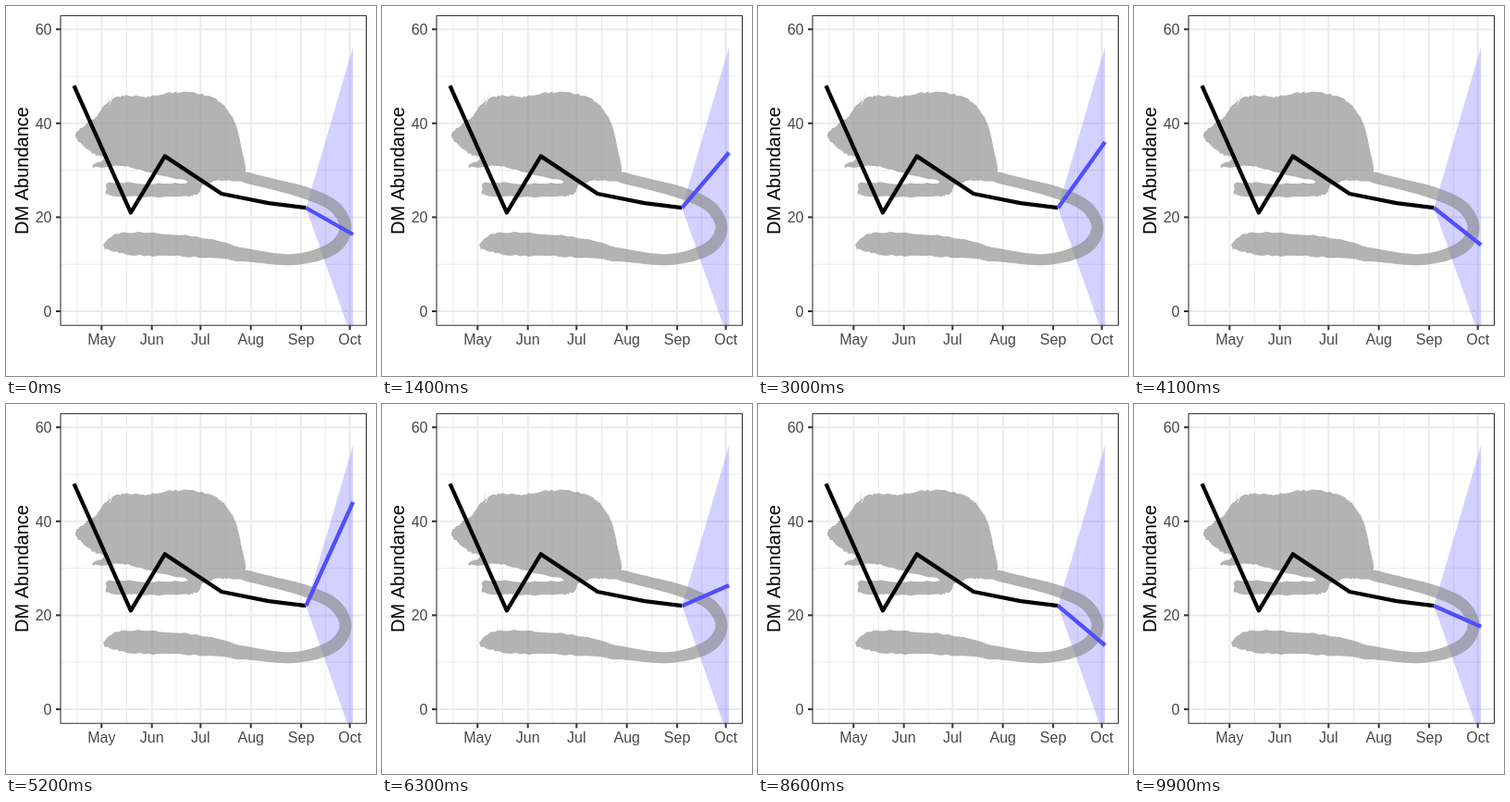
Recreate the animation shown at these times as an HTML page with a canvas. Size 400 by 400 pixels, loop 10 s.

```html
<!DOCTYPE html>
<html lang="en">
<head>
<meta charset="utf-8">
<title>Abundance forecast</title>
<style>
html, body { margin: 0; width: 100%; height: 100%; overflow: hidden; background: #fff; }
canvas { display: block; }
</style>
</head>
<body>
<canvas id="chart" width="400" height="400"></canvas>
<script>
const ctx = document.getElementById('chart').getContext('2d');
const left = 59, top_ = 10.5, right = 389.5, bottom = 345.3;
const font = '"Liberation Sans", Arial, sans-serif';

// Scales: days counted from the first of May, and abundance.
const xOf = day => 103.3 + day * 1.7543;
const yOf = v => 330 - v * 5.08;
const months = ['May', 'Jun', 'Jul', 'Aug', 'Sep', 'Oct'];
const monthStart = i => Math.round((Date.UTC(2023, 4 + i) - Date.UTC(2023, 4)) / 864e5);

const history = [[-17, 48], [18, 21], [39, 33], [74, 25], [103, 23], [126, 22]]
  .map(([day, v]) => [xOf(day), yOf(v)]);
const start = history[history.length - 1];
const endX = xOf(155);

// End height of each simulated outcome; four steps lead from one to the next.
const outcomes = [247, 79, 150, 150, 167, 131, 67, 78, 216, 303, 260, 235, 250,
  106, 170, 180, 197, 98, 247, 240, 61, 195, 327, 350, 147];
const stepMs = 100, stepsPer = 4;

const body = [
  [75, 141], [85, 129], [98, 119], [108, 106], [122, 98], [141, 97], [151, 98.5],
  [180, 93.5], [212, 95.5], [234, 106], [248, 127], [255, 156], [259, 178], [251, 188],
  [230, 189], [213, 194], [207, 203], [185, 206.5], [115, 205], [109, 198], [114, 191],
  [165, 192], [197, 190], [155, 180], [126, 173], [93, 174], [106, 165], [92, 158]
];
// Centre and half width along the tail.
const tail = [
  [245, 182, 6], [290, 193, 6], [325, 202.5, 6.5], [355, 217, 6.5], [367, 240, 6.5],
  [353, 262, 7], [312, 274, 6], [262, 269.5, 7], [205, 260.5, 11], [150, 257.5, 12.5],
  [120, 256.5, 10], [104, 261, 1]
];

// Catmull-Rom curve through points of any dimension.
function spline(points, closed) {
  const n = points.length, out = [], parts = 10;
  const at = i => points[closed ? (i + n) % n : Math.min(Math.max(i, 0), n - 1)];
  for (let i = 0; i < (closed ? n : n - 1); i++) {
    const [a, b, c, d] = [at(i - 1), at(i), at(i + 1), at(i + 2)];
    for (let k = 0; k < parts; k++) {
      const t = k / parts;
      out.push(b.map((p, j) => p + t / 2 * (c[j] - a[j]
        + t * (2 * a[j] - 5 * p + 4 * c[j] - d[j] + t * (3 * (p - c[j]) + d[j] - a[j])))));
    }
  }
  return out;
}

function tube(spine) {
  const outer = [], inner = [];
  spine.slice(0, -1).forEach(([x, y, half], i) => {
    const dx = spine[i + 1][0] - x, dy = spine[i + 1][1] - y, len = Math.hypot(dx, dy);
    outer.push([x + dy / len * half, y - dx / len * half]);
    inner.unshift([x - dy / len * half, y + dx / len * half]);
  });
  return [...outer, ...inner];
}

// The silhouette is furry everywhere except along the thin part of the tail.
const rat = new Path2D();
for (const outline of [spline(body, true), tube(spline(tail, false))]) {
  outline.forEach(([x, y], i) => {
    const fur = x < 255 ? Math.sin(i * i * 12.9) * 0.8 : 0;
    rat[i ? 'lineTo' : 'moveTo'](x, y + fur);
  });
  rat.closePath();
}

function line(points, color, width) {
  ctx.strokeStyle = color;
  ctx.lineWidth = width;
  ctx.beginPath();
  points.forEach(p => ctx.lineTo(...p));
  ctx.stroke();
}
const vLine = (x, w) => line([[x, top_], [x, bottom]], '#ebebeb', w);
const hLine = (y, w) => line([[left, y], [right, y]], '#ebebeb', w);

function text(label, x, y, size, align, color) {
  ctx.font = size + 'px ' + font;
  ctx.textAlign = align;
  ctx.fillStyle = color;
  ctx.fillText(label, x, y);
}

function drawGrid() {
  for (let i = 0; i <= months.length; i++) {
    vLine(xOf((monthStart(i - 1) + monthStart(i)) / 2), 1);
  }
  for (let v = 10; v < 60; v += 20) hLine(yOf(v), 1);
  months.forEach((_, i) => vLine(xOf(monthStart(i)), 2));
  for (let v = 0; v <= 60; v += 20) hLine(yOf(v), 2);
}

function drawAxes() {
  ctx.strokeStyle = '#333';
  ctx.lineWidth = 1.1;
  ctx.strokeRect(left, top_, right - left, bottom - top_);
  months.forEach((name, i) => {
    const x = xOf(monthStart(i));
    line([[x, bottom], [x, bottom + 5]], '#333', 2);
    text(name, x, 366, 16, 'center', '#474747');
  });
  for (let v = 0; v <= 60; v += 20) {
    line([[left - 5, yOf(v)], [left, yOf(v)]], '#333', 2);
    text(v, 49.5, yOf(v) + 5.8, 16, 'right', '#474747');
  }
  ctx.save();
  ctx.translate(24, 178);
  ctx.rotate(-Math.PI / 2);
  text('DM Abundance', 0, 0, 20, 'center', '#000');
  ctx.restore();
}

function outcomeAt(step) {
  const i = Math.floor(step / stepsPer), t = step % stepsPer / stepsPer;
  const from = outcomes[i], to = outcomes[(i + 1) % outcomes.length];
  const eased = t < 0.5 ? 4 * t ** 3 : 1 - 4 * (1 - t) ** 3;
  return from + (to - from) * eased;
}

function draw(now) {
  const step = Math.floor(now / stepMs) % (outcomes.length * stepsPer);
  ctx.fillStyle = '#fff';
  ctx.fillRect(0, 0, 400, 400);
  ctx.lineJoin = 'round';

  ctx.save();
  ctx.beginPath();
  ctx.rect(left, top_, right - left, bottom - top_);
  ctx.clip();
  drawGrid();

  ctx.fillStyle = 'rgba(40,20,255,.195)';
  ctx.beginPath();
  [start, [endX, 44], [endX, 363]].forEach(p => ctx.lineTo(...p));
  ctx.fill();

  ctx.fillStyle = 'rgba(140,140,140,.66)';
  ctx.fill(rat);
  for (const x of [108, 112]) line([[x, 107], [x + 4, 95]], '#ececec', 1);

  line(history, '#000', 4.27);
  line([start, [endX, outcomeAt(step)]], '#4f4fff', 4.27);
  ctx.restore();

  drawAxes();
}

function tick() {
  draw(performance.now());
  requestAnimationFrame(tick);
}
tick();
</script>
</body>
</html>
```
